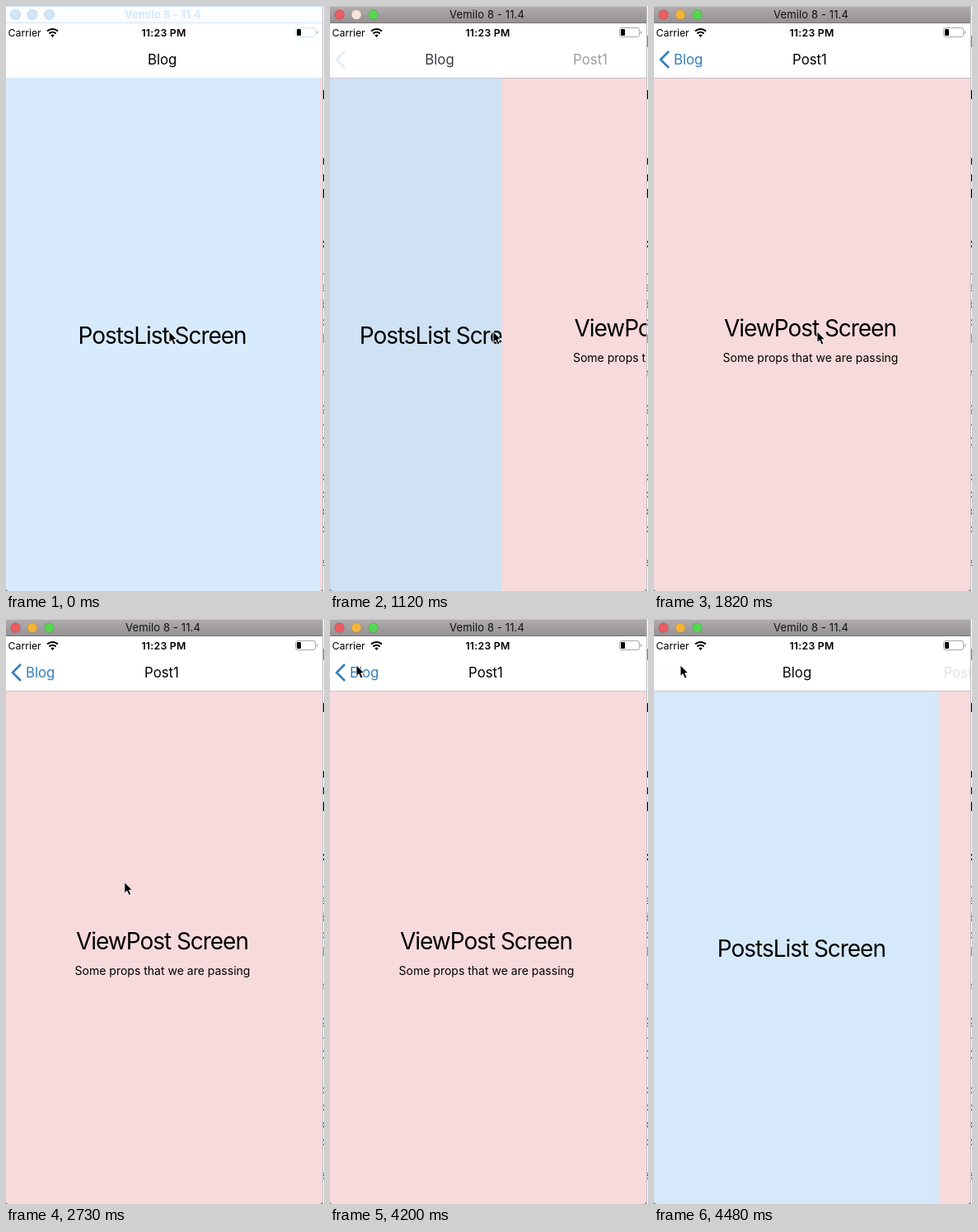
These frames come from a looping animation (386 by 710 pixels, 4.55 s). An HTML page:

```html
<!DOCTYPE html>
<html lang="en">
<head>
<meta charset="utf-8">
<title>Stack navigation</title>
<style>
  html, body { margin: 0; width: 100%; height: 100%; overflow: hidden; background: #fff; }
  svg { display: block; width: 386px; height: 710px; font-family: Inter, Roboto, sans-serif; font-optical-sizing: none; }
  .mid { text-anchor: middle; }
  .big { font-size: 28px; letter-spacing: -.037em; }
  .sub { font-size: 14px; }
  .nav { font-size: 16.8px; }
  .status { font-size: 12.3px; }
  .clock { font-weight: 600; letter-spacing: .02em; }
  .bar { font-size: 13px; letter-spacing: .01em; }
</style>
</head>
<body>
<svg viewBox="0 0 386 710">
  <defs>
    <linearGradient id="steel" x2="0" y2="1">
      <stop stop-color="#b1adaf"/><stop offset="1" stop-color="#959193"/>
    </linearGradient>
    <linearGradient id="fade">
      <stop stop-color="#000" stop-opacity="0"/><stop offset="1" stop-color="#000" stop-opacity=".2"/>
    </linearGradient>
    <clipPath id="window"><path d="M0 0H384V706a4 4 0 0 1-4 4H4a4 4 0 0 1-4-4Z"/></clipPath>
  </defs>

  <!-- page behind the window -->
  <rect width="386" height="710" fill="#fff"/>
  <rect y="704" width="384" height="6" fill="#6f7b86"/>
  <g id="page"></g>
  <rect id="blueTab" x="384" y="36" width="2" height="14" fill="#3f9bd6"/>
  <path d="M384.5 0V710" stroke="#b9bdc1"/>

  <g clip-path="url(#window)">
    <g id="list">
      <rect y="87" width="384" height="623" fill="#d7ebfd"/>
      <text class="big mid" x="189.5" y="410">PostsList Screen</text>
      <rect id="dim" y="87" width="384" height="623"/>
    </g>
    <g id="post">
      <rect id="shadow" x="-9" y="87" width="6" height="623" fill="url(#fade)"/>
      <rect x="-3" y="87" width="387" height="623" fill="#f7dadb"/>
      <text class="big mid" x="189.5" y="401">ViewPost Screen</text>
      <text class="sub mid" x="190" y="432">Some props that we are passing</text>
    </g>

    <rect y="21" width="384" height="66" fill="#fff"/>
    <path id="rule" d="M0 87.5H384" stroke="#c8c4c6"/>
    <path id="chevron" d="M18 55 8 65l10 10" fill="none" stroke="#337fbd" stroke-width="2.6"/>
    <g class="nav">
      <g id="blog">
        <text id="blogTitle" y="71">Blog</text>
        <text id="blogBack" y="71" fill="#337fbd">Blog</text>
      </g>
      <text id="postTitle" y="71">Post1</text>
    </g>

    <g class="status">
      <text x="2.5" y="37">Carrier</text>
      <text class="clock mid" x="191.5" y="37">11:23 PM</text>
    </g>
    <g fill="none" stroke="#000" stroke-width="2">
      <path d="M50 30.6a9.5 9.5 0 0 1 13 0M52.4 33.4a6 6 0 0 1 8.2 0"/>
      <path d="M56.5 38l-2.2-2.4a3.2 3.2 0 0 1 4.4 0Z" fill="#000" stroke="none"/>
    </g>
    <rect id="battery" x="351.5" y="26.5" width="24" height="11" rx="2.5" fill="none"/>
    <path d="M377.5 30.5v3" stroke="#888"/>
    <rect x="353" y="28" width="5" height="8" rx="1"/>

    <rect id="bar" width="384" height="21"/>
    <path id="barTop" d="M0 .5H384"/>
    <path id="barEdge" d="M0 20.5H384"/>
    <g stroke="#000" stroke-opacity=".12">
      <circle id="red" cx="11.5" cy="10.5" r="6"/>
      <circle id="yellow" cx="32" cy="10.5" r="6"/>
      <circle id="green" cx="52.5" cy="10.5" r="6"/>
    </g>
    <text id="name" class="bar mid" x="190.5" y="15">Vemilo 8 - 11.4</text>
  </g>

  <path id="cursor" d="M0 0V13.5L3 10.7 5.3 16 7.9 14.9 5.7 9.7H9.6Z" stroke="#fff" stroke-width=".9"/>
</svg>

<script>
const LOOP = 4550, STEP = 70, WIDTH = 384;
const ACTIVATE = 980, PUSH = 1048, POP = 4268, SLIDE = 530;
const POINT_START = 2100, POINT_END = 4030;

const el = id => document.getElementById(id);
const set = (id, attrs) => { for (const k in attrs) el(id).setAttribute(k, attrs[k]); };
const move = (id, x, y) => set(id, {transform: `translate(${x} ${y})`});
const fade = (id, opacity) => set(id, {opacity});
const mix = (a, b, u) => a + (b - a) * u;
const span = (t, start, end) => Math.min(1, Math.max(0, (t - start) / (end - start)));

// cubic-bezier(.2833, .99, .3183, .99)
function ease(x) {
  const curve = (s, a, b) => 3 * (1 - s) ** 2 * s * a + 3 * (1 - s) * s * s * b + s ** 3;
  let low = 0, high = 1;
  for (let i = 0; i < 24; i++) {
    const s = (low + high) / 2;
    if (curve(s, .2833, .3183) < x) low = s; else high = s;
  }
  return curve(low, .99, .99);
}

// Slivers of text beside the window, one glyph per line
function sliver(glyphs, top, leading, style) {
  return [...glyphs].map((c, i) => `<text x="383" y="${top + leading * i}" ${style}>${c}</text>`).join('');
}
el('page').innerHTML =
  sliver('I   edl  :', 113, 20, 'font-size="15" font-weight="700"') +
  sliver(',abcI n g-3 coxo s', 325, 20.9, 'font-size="14" fill="#444"');

function drawWindow(active, washed) {
  const pick = (on, off = '#cfe6fb') => active ? on : off;
  set('bar', {fill: pick('url(#steel)', '#fcfdff')});
  set('barTop', {stroke: pick('#c9c6c8')});
  set('barEdge', {stroke: pick('#777375')});
  set('red', {fill: pick('#ea5d60')});
  set('yellow', {fill: pick(washed ? '#fae3d9' : '#f3b43b')});
  set('green', {fill: pick('#56d650')});
  set('name', {fill: pick('#111'), 'font-weight': pick(400, 600)});
  set('battery', {stroke: pick('#b0a3a4')});
  fade('rule', pick(1, 0));
  fade('blueTab', pick(1, 0));
}

function drawCards(open, popping) {
  move('list', -.3 * WIDTH * open, 0);
  move('post', WIDTH * (1 - open), 0);
  fade('dim', .085 * open);
  fade('shadow', popping ? open : 0);
}

function drawHeader(open) {
  move('blog', mix(172, 24, open), 0);
  fade('blogTitle', 1 - open ** 1.5);
  fade('blogBack', open ** 3);
  fade('chevron', open ** 2);
  move('postTitle', mix(374, 168, open), 0);
  fade('postTitle', open);
}

function drawCursor(t) {
  const u = span(t, POINT_START, POINT_END);
  move('cursor', mix(198, 32, u), mix(395, 56, u ** 1.34));
}

function frame() {
  const t = Math.floor(performance.now() % LOOP / STEP) * STEP;
  const popping = t >= POP, start = popping ? POP : PUSH;
  const slide = ease(span(t, start, start + SLIDE));
  const lagging = slide ** 1.2;
  drawWindow(t >= ACTIVATE, slide > .001 && slide < .8);
  drawCards(popping ? 1 - slide : slide, popping);
  drawHeader(popping ? 1 - lagging : lagging);
  drawCursor(t);
  requestAnimationFrame(frame);
}
frame();
</script>
</body>
</html>
```
